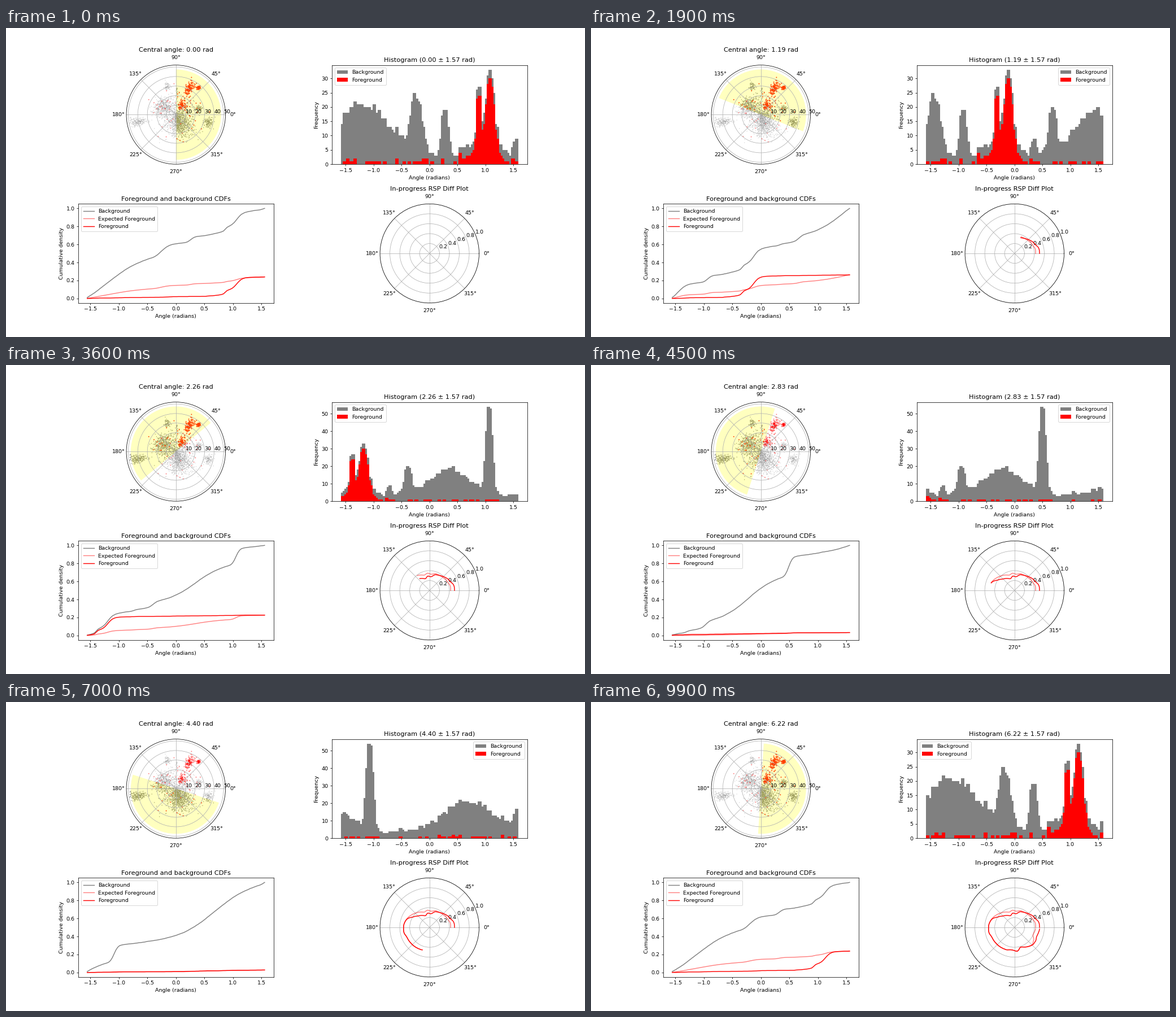
Animation, 1025 px wide and 547 px high, one loop 10000 ms. Source, as a matplotlib script:

```python
import numpy as np
import matplotlib.pyplot as plt
from matplotlib.animation import FuncAnimation

FRAMES = 100
BINS = 200                      # histogram bins around the full circle
HALF = BINS // 2                # bins inside the half-circle window
STEP = 2 * np.pi / BINS
DPI = 205 / 3

# Clusters: peak count per bin, angle, angle spread, radius, radius spread
BG_CLUSTERS = [(52, 3.33, 0.052, 41, 5), (15, 2.62, 0.33, 17, 4.5),
               (15, 1.87, 0.06, 31, 2), (6, 1.54, 0.03, 24, 3),
               (16, 0.275, 0.05, 24.5, 2.5), (20, 6.045, 0.08, 35, 2.6),
               (17, 5.1, 0.45, 13, 7)]
FG_CLUSTERS = [(22, 0.88, 0.028, 37, 1.3), (26, 1.085, 0.065, 31, 4),
               (5, 0.97, 0.2, 12, 3)]
BG_BASE, FG_BASE = 3, 0.3       # even spread per bin

rng = np.random.default_rng(12)


def bumps(clusters):
    theta = (np.arange(BINS) + 0.5) * STEP
    total = np.zeros(BINS)
    for height, angle, spread, *_ in clusters:
        d = (theta - angle + np.pi) % (2 * np.pi) - np.pi
        total += height * np.exp(-0.5 * (d / spread) ** 2)
    return total


def make_points(clusters, base, base_r, base_spread):
    n = int(base * BINS)
    theta = [rng.uniform(0, 2 * np.pi, n)]
    r = [rng.normal(base_r, base_spread, n)]
    for height, angle, spread, radius, radius_spread in clusters:
        n = int(height * spread * np.sqrt(2 * np.pi) / STEP)
        theta.append(rng.normal(angle, spread, n))
        r.append(rng.normal(radius, radius_spread, n))
    theta, r = np.concatenate(theta), np.abs(np.concatenate(r))
    return theta[r < 49.5], r[r < 49.5]


fg_bins = np.rint(bumps(FG_CLUSTERS)) + rng.poisson(FG_BASE, BINS)
noise = rng.uniform(-1.5, 1.5, BINS)
bg_bins = fg_bins + np.rint(bumps(BG_CLUSTERS) + BG_BASE + noise)
bg_pts = make_points(BG_CLUSTERS, BG_BASE, 9, 6)
fg_pts = make_points(FG_CLUSTERS, FG_BASE, 18, 9)


def window(i):
    idx = (2 * i - HALF // 2 + np.arange(HALF)) % BINS
    return bg_bins[idx], fg_bins[idx]


def cdfs(i):
    bg, fg = window(i)
    total = bg.sum()
    cum = bg.cumsum() / total
    return cum, cum * fg.sum() / total, fg.cumsum() / total


fig = plt.figure(figsize=(15, 8.0049), dpi=DPI, facecolor="white")
fig.subplots_adjust(wspace=0.3, hspace=0.4)

# Scatter with the moving half disc
ax_pts = fig.add_subplot(221, projection="polar")
bg_dots = ax_pts.scatter(*bg_pts, s=2, linewidths=0)
fg_dots = ax_pts.scatter(*fg_pts, s=4, linewidths=0)
wedge = ax_pts.bar(0, 47.4, width=np.pi, color="yellow", alpha=0.25,
                   zorder=1.2)[0]
ax_pts.set_ylim(0, 52)
ax_pts.set_yticks(range(10, 51, 10))
ax_pts.set_rlabel_position(0)

# Histogram: each bar is two bins wide, so neighbours overlap
ax_hist = fig.add_subplot(222)
edges = (np.arange(HALF + 2) - (HALF + 1) / 2) * STEP
bg_bars, fg_bars = [
    ax_hist.stairs(np.zeros(HALF + 1), edges, fill=True, color=c, label=name)
    for c, name in (("gray", "Background"), ("red", "Foreground"))]
ax_hist.set_xlim(1.1 * edges[0], 1.1 * edges[-1])
ax_hist.set_xlabel("Angle (radians)")
ax_hist.set_ylabel("Frequency")
legend = ax_hist.legend(loc="upper left")

# Cumulative curves
ax_cdf = fig.add_subplot(223)
centres = (np.arange(HALF) - (HALF - 1) / 2) * STEP
cdf_lines = [
    ax_cdf.plot([], [], color="gray", label="Background")[0],
    ax_cdf.plot([], [], color="red", alpha=0.5, label="Expected Foreground")[0],
    ax_cdf.plot([], [], color="red", label="Foreground")[0],
]
ax_cdf.set_xlim(1.1 * centres[0], 1.1 * centres[-1])
ax_cdf.set_ylim(-0.05, 1.05)
ax_cdf.set_title("Foreground and background CDFs")
ax_cdf.set_xlabel("Angle (radians)")
ax_cdf.set_ylabel("Cumulative density")
ax_cdf.legend(loc="upper left")

# Polar trace of the mean gap between the curves
ax_diff = fig.add_subplot(224, projection="polar")
expected_trace, = ax_diff.plot([], [], color="red", alpha=0.5)
actual_trace, = ax_diff.plot([], [], color="red")
ax_diff.set_ylim(0, 1)
ax_diff.set_yticks([0.2, 0.4, 0.6, 0.8, 1.0])
ax_diff.set_title("In-progress RSP Diff Plot")

angles = np.arange(FRAMES) * 2 * np.pi / FRAMES
gaps = np.array([[np.mean(b - e), np.mean(b - f)]
                 for b, e, f in map(cdfs, range(FRAMES))])


def shade(dots, theta, centre, rgb, faint):
    inside = np.cos(theta - centre) >= 0
    colors = np.empty((len(theta), 4))
    colors[:, :3] = rgb
    colors[:, 3] = np.where(inside, 1, faint)
    dots.set_facecolor(colors)


def overlap(h):
    padded = np.r_[0, h, 0]
    return np.maximum(padded[:-1], padded[1:])


def update(i):
    a = angles[i]
    ax_pts.set_title(f"Central angle: {a:.2f} rad")
    shade(bg_dots, bg_pts[0], a, (0.5, 0.5, 0.5), 0.35)
    shade(fg_dots, fg_pts[0], a, (1, 0, 0), 0.5)
    wedge.set_x(a - np.pi / 2)

    bg, fg = map(overlap, window(i))
    bg_bars.set_data(bg)
    fg_bars.set_data(fg)
    top = 1.05 * bg.max()
    ax_hist.set_ylim(0, top)
    ax_hist.set_title(f"Histogram ({a:.2f} ± 1.57 rad)")
    # The legend moves left when tall bars reach its corner
    blocked = bg[edges[1:] > 0.77].max() > 0.79 * top
    legend.set_loc("upper left" if blocked else "upper right")

    for line, y in zip(cdf_lines, cdfs(i)):
        line.set_data(centres, y)
    expected_trace.set_data(angles[:i + 1], gaps[:i + 1, 0])
    actual_trace.set_data(angles[:i + 1], gaps[:i + 1, 1])
    return []


anim = FuncAnimation(fig, update, frames=FRAMES, interval=100, repeat=True,
                     repeat_delay=0, init_func=lambda: update(0))
plt.show()
```
